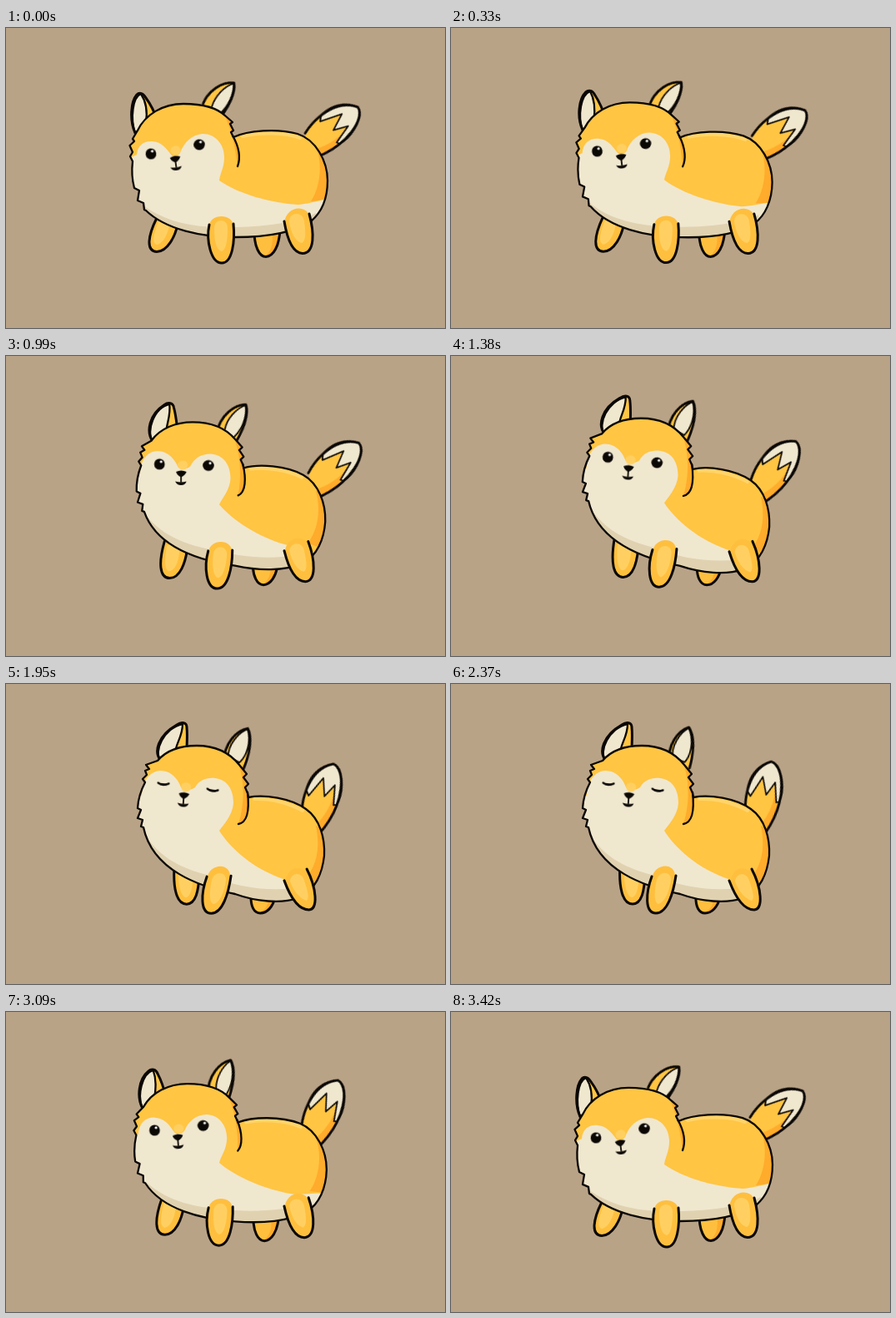
Write an HTML page without scripts that moves like this. It is 527x360 px and loops after 3.45 s.

```html
<!DOCTYPE html>
<html lang="en">
<head>
<meta charset="utf-8">
<title>Floating fox</title>
<style>
html, body { margin: 0; width: 100%; height: 100%; overflow: hidden; background: #b9a387; }
svg { display: block; width: 100vw; height: 100vh; }

.ink { stroke: #0b0804; stroke-width: 2.3; stroke-linecap: round; stroke-linejoin: round; }
.bold { stroke-width: 3; }
.thin { stroke-width: 1.8; }
.line { fill: none; }
.orange { fill: #ffc543; }
.amber { fill: #ffbf3e; }
.deep { fill: #ffab2b; }
.light { fill: #ffd061; }
.cream { fill: #f0e7cf; }
.shade { fill: #e0d2b0; }
.black { fill: #0b0804; }

/* --a is the resting pose, --b the lifted pose */
.morph, .move, .leg path, .tail, .ear, .eye, .lid { animation: 3450ms infinite; }
.morph { d: var(--a); animation-name: morph; }
.move { transform: var(--a); animation-name: move; }
.leg path, .late { d: var(--a); animation-name: late; }
.tail { animation-name: tail; }
.ear { animation-name: ear; }
.eye { animation-name: blink; }
.lid { opacity: 0; animation-name: lid; }
.morph, .move, .leg path { animation-timing-function: cubic-bezier(.37, 0, .63, 1); }
.tail, .ear { animation-timing-function: linear; }

@keyframes morph { 0%, 100% { d: var(--a); } 46.4%, 71.5% { d: var(--b); } }
@keyframes move { 0%, 100% { transform: var(--a); } 46.4%, 71.5% { transform: var(--b); } }
@keyframes late { 0%, 100% { d: var(--a); } 64%, 70% { d: var(--b); } }
@keyframes tail {
  0% { transform: translate(363px, 141px) rotate(52deg); }
  18.3% { transform: translate(367px, 147px) rotate(53.5deg); }
  29% { transform: translate(368px, 155px) rotate(47.5deg); }
  40% { transform: translate(367.5px, 161.5px) rotate(38deg); }
  56.5% { transform: translate(366px, 166px) rotate(21deg); }
  68.7% { transform: translate(366px, 166px) rotate(14deg); }
  80% { transform: translate(366px, 156px) rotate(4.5deg); animation-timing-function: cubic-bezier(.4, 0, .6, 1); }
  100% { transform: translate(363px, 141px) rotate(52deg); }
}
@keyframes ear {
  0%, 18.3% { transform: rotate(35deg); }
  40% { transform: rotate(20deg); }
  56.5% { transform: rotate(18deg); }
  68.7% { transform: rotate(11deg); }
  80% { transform: rotate(-1deg); animation-timing-function: cubic-bezier(.4, 0, .6, 1); }
  100% { transform: rotate(35deg); }
}
@keyframes blink { 0%, 45% { transform: none; } 48%, 72% { transform: scaleY(.1); } 75%, 100% { transform: none; } }
@keyframes lid { 0%, 47% { opacity: 0; } 48%, 72% { opacity: 1; } 73%, 100% { opacity: 0; } }

.silhouette {
  --a: path("M273 131 C290 123 325 120 350 127 C372 134 386 160 386 183 C386 205 378 222 366 232 C345 246 310 251 275 251 C235 251 192 242 168 219 L166 218 L165 210 L158 207 L160 195 L154 192 Q150 177 152 160 L149 154 L152 149 L148.5 141 L154 136 L152 133 L158 123 C167 104 188 91 213 91 C240 91 256 98 264 106 L272 113 L269 115 L273 123 L270 125 L273 131 Z");
  --b: path("M291 136 C310 132 342 137 360 150 C377 162 383 185 382 206 C380 225 372 249 350 257 C330 264 300 261 275 252 C232 243 176 224 165 172 L162 171 L164 163 L158 161 L162 151 L158 149 Q159 133 167 118 L164 114 L169 109 L167 104 L172 102 L168 97 L182 92 C193 79 211 74 229 74 C250 74 268 82 280 97 L289 108 L285 112 L291 120 L287 124 L290 131 Z");
}
.left-ear {
  --a: path("M155 126 C148 110 150 88 157 80 C160 77 165 78 168 84 C174 92 178 100 182 112");
  --b: path("M186 92 C177 82 182 62 205 49 C211 45 217 46 217 52 C218 62 217 70 217 80");
}
.left-ear-inner {
  --a: path("M162 79 C152 83 149 108 155 126 L168 114 C170 100 168 88 162 79");
  --b: path("M212 48 C190 52 176 82 186 92 L203 84 C203 72 212 64 212 48");
}
.right-ear-inner {
  --a: path("M1 -39 C-6 -30 -9 -14 -4 0 L8 2 C12 -14 8 -30 1 -39");
  --b: path("M1 -39 C-8 -32 -16 -14 -11 0 L4 2 C10 -8 10 -26 1 -39");
}
.mask {
  --a: path("M140 160 L157 152 C158 140 166 135 176 136 C188 137 193 146 199 153 C202 156 206 154 209 150 C214 136 224 128 236 127 C252 127 262 140 262 155 C262 168 257 174 256 183 C280 200 320 210 350 212 C362 211 372 208 390 204 L390 260 L140 260 Z");
  --b: path("M140 140 L163 134 C164 115 173 105 185 104 C199 104 207 115 210 124 C214 128 222 128 227 124 C232 115 241 112 251 113 C267 115 273 128 273 143 C272 158 260 170 256 176 C268 195 295 222 336 235 C345 238 352 240 360 250 L340 280 L140 260 Z");
}
.belly {
  --a: path("M165 213 C195 235 230 239 260 239 C300 240 345 235 372 222 L372 262 L160 262 Z");
  --b: path("M160 168 C178 206 208 221 245 230 C275 243 310 249 345 245 L345 270 L160 262 Z");
}
.rump {
  --a: path("M366 208 C378 190 380 160 372 143 L392 150 L392 205 Z");
  --b: path("M361 232 C374 215 377 195 372 170 L392 180 L392 250 Z");
}
.back-light {
  --a: path("M284 130 C305 125 335 125 353 132");
  --b: path("M298 138 C318 137 340 143 356 152");
}
.head-shade {
  --a: path("M262 104 L273 112 L275 131 C281 145 281 158 278 166 C276 148 272 125 262 104");
  --b: path("M279 95 L290 110 L291 131 C292 148 290 166 279 168 C285 150 288 122 279 95");
}
.crease {
  --a: path("M272 129 C281 145 281 158 278 166");
  --b: path("M290 130 C292 148 291 166 279 168");
}

.far-front { --a: path("M181 228 C170 250 168 268 181 268.5 C194 268 203 250 206 236"); --b: path("M203 215 C201 245 206 264 218 264 C230 264 232 245 233 230"); }
.far-front-light { --a: path("M183 232 C178 245 174 258 181 260 C190 258 196 244 197 230"); --b: path("M208 220 C207 240 211 255 217 256 C224 255 226 240 225 222"); }
.far-back { --a: path("M298 244 C298 262 304 274.5 312 274.5 C321 274 328 262 329 242"); --b: path("M294 252 C293 268 298 275 305 275 C313 275 320 268 323 256"); }
.far-back-deep { --a: path("M312 273 C320 266 321 255 319 242 L329 242 C328 262 321 274 312 273"); --b: path("M305 274 C312 270 316 263 315 254 L323 256 C320 268 313 275 305 274"); }
.front-top { --a: path("M244 238 C244 222 273 222 273 238"); --b: path("M241 233 C245 214 270 214 269 232"); }
.front { --a: path("M244 236 C240 255 246 282 259 282 C272 282 275 255 273 235"); --b: path("M241 231 C234 250 232 275 246 275 C260 275 267 250 270 230"); }
.front-light { --a: path("M250 240 C250 228 266 228 266 240 C266 255 264 266 259 268 C252 266 250 255 250 240"); --b: path("M247 235 C250 224 264 224 264 235 C262 250 256 262 249 264 C243 262 244 248 247 235"); }
.hind-top { --a: path("M334 234 C336 214 360 210 366 228"); --b: path("M335 238 C338 220 352 216 363 228"); }
.hind { --a: path("M334 232 C337 250 343 270 356 270.5 C371 270 370 245 364 223"); --b: path("M334 236 C340 252 350 271 364 271 C375 270 373 245 361 222"); }
.hind-light { --a: path("M340 232 C340 220 357 220 358 232 C360 246 360 256 355 258 C347 256 342 246 340 232"); --b: path("M341 237 C342 226 355 225 358 236 C362 248 365 257 361 260 C353 258 345 248 341 237"); }
</style>
</head>
<body>
<svg viewBox="0 0 527 360" preserveAspectRatio="none">
  <clipPath id="inside"><path class="morph silhouette"/></clipPath>

  <g class="leg">
    <path class="amber far-front"/>
    <path class="light far-front-light"/>
    <path class="line ink bold far-front"/>
    <path class="amber far-back"/>
    <path class="deep far-back-deep"/>
    <path class="line ink bold far-back"/>
  </g>

  <g class="tail">
    <path class="orange" d="M-14 -6 C-21 -25 -24 -60 0 -75 C14 -76 32 -38 14 10Z"/>
    <path class="deep" d="M3 8 C12 -8 15 -22 14 -42 L22 -31 C22 -14 19 0 14 10Z"/>
    <path class="cream ink thin" d="M-19 -34 L-14 -29 L-5 -55 L4 -35 L11 -52 L18 -29 L22 -31 C24 -52 12 -76 0 -75 C-15 -68 -22 -50 -19 -34Z"/>
    <path class="line ink bold" d="M-14 -6 C-21 -25 -24 -60 0 -75 C14 -76 32 -38 14 10"/>
  </g>

  <path class="morph orange left-ear"/>
  <path class="morph cream ink left-ear-inner"/>
  <path class="morph line ink bold left-ear"/>
  <g class="move" style="--a:translate(250px,98px);--b:translate(277px,91px)">
    <g class="ear">
      <path class="orange" d="M-15 2 C-19 -14 -12 -33 1 -40 C9 -32 13 -14 11 8"/>
      <path class="morph late cream ink thin right-ear-inner"/>
      <path class="line ink bold" d="M-15 2 C-19 -14 -12 -33 1 -40 C9 -32 13 -14 11 8"/>
    </g>
  </g>

  <path class="morph orange silhouette"/>
  <g clip-path="url(#inside)">
    <path class="morph deep rump"/>
    <path class="morph line back-light" stroke="#ffd46a" stroke-width="4" stroke-linecap="round"/>
    <path class="morph deep head-shade"/>
    <path class="morph cream mask"/>
    <path class="morph shade belly"/>
  </g>
  <path class="morph line ink silhouette"/>
  <path class="morph line ink crease"/>

  <g class="leg">
    <path class="amber front-top"/>
    <path class="amber front"/>
    <path class="light front-light"/>
    <path class="line ink bold front"/>
    <path class="amber hind-top"/>
    <path class="amber hind"/>
    <path class="light hind-light"/>
    <path class="line ink bold hind"/>
  </g>

  <g class="move" style="--a:translate(174px,151px) rotate(-8deg);--b:translate(189px,120px) rotate(4deg)">
    <g class="eye"><ellipse class="black" rx="6.4" ry="6.6"/><circle cx="2" cy="-3" r="1.6" fill="#fff"/></g>
    <path class="lid line ink" d="M-6.5 -1 Q0 3 6.5 -1"/>
  </g>
  <g class="move" style="--a:translate(232px,140px) rotate(-8deg);--b:translate(248px,127.5px) rotate(8deg)">
    <g class="eye"><ellipse class="black" rx="6.8" ry="6.4"/><circle cx="2" cy="-3" r="1.6" fill="#fff"/></g>
    <path class="lid line ink" d="M-6.5 -1 Q0 3 6.5 -1"/>
  </g>
  <g class="move" style="--a:translate(203px,157px) rotate(-8deg);--b:translate(213.5px,133.5px) rotate(4deg)">
    <ellipse class="light" cx="2" cy="-10" rx="6" ry="5.5"/>
    <path class="black" d="M-6 -2 Q0 -5 6.5 -2 Q5 2 0 4.5 Q-5 2 -6 -2Z"/>
    <path class="line ink thin" d="M0 4 V10"/>
    <path class="black" d="M-7 9.5 Q0 11.5 6.5 9.5 Q5 14 0 14 Q-5 14 -7 9.5Z"/>
  </g>
</svg>
</body>
</html>
```
